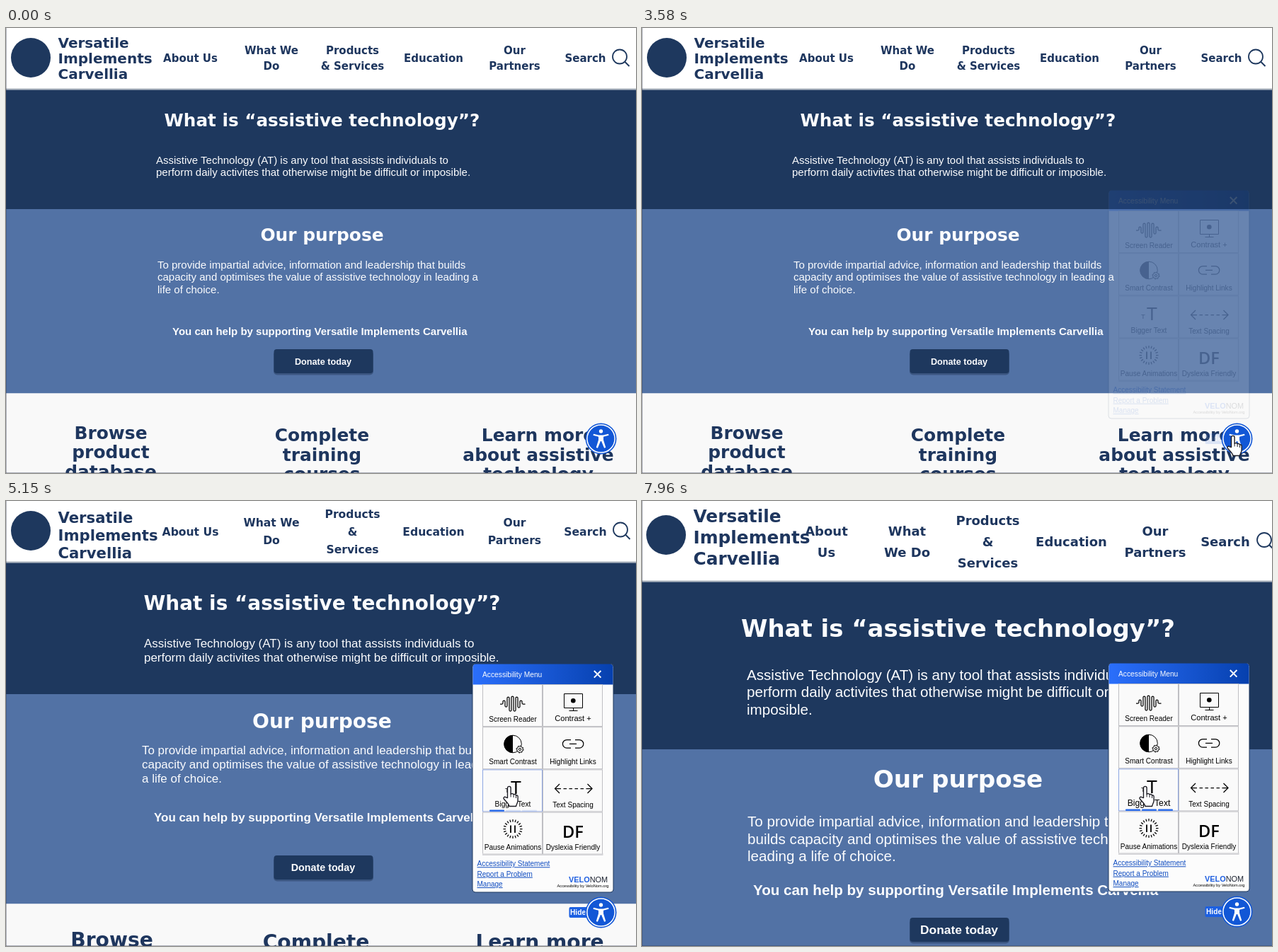
Recreate the animation shown at these times as an HTML page. Size 890 by 629 pixels, loop 8 s.

```html
<!DOCTYPE html>
<html lang="en">
<head>
<meta charset="utf-8">
<title>Bigger text demo</title>
<style>
  html, body { margin: 0; width: 100%; height: 100%; overflow: hidden; background: #fff; }
  svg { display: block; width: 100%; height: 100%; }
  text { font-family: "Liberation Sans", Arial, sans-serif; }
  .head { font-family: "DejaVu Sans", Verdana, sans-serif; font-weight: 700; }
  .bold { font-weight: 700; }
  .mid { text-anchor: middle; }
  .white { fill: #fbfcfe; }
  .navy { fill: #1e365e; }
  .link { fill: #0f4cc0; text-decoration: underline; }
  .line { fill: none; stroke: #000; stroke-width: 1.25; }
  .thin { fill: none; stroke: #000; stroke-width: 1; }
  .cell { fill: #fafafa; stroke: #bfbfc3; }
  .pointer { fill: #fff; stroke: #1c1c24; stroke-width: 1.4; stroke-linejoin: round; }
</style>
</head>
<body>
<svg id="stage" viewBox="0 0 890 629" preserveAspectRatio="none"></svg>
<script>
const LOOP = 8000;
const NAVY = '#1e385e', BLUE = '#5272a5';

const text = (x, y, s, size, cls = '') =>
  `<text x="${x}" y="${y}" font-size="${size}" class="${cls}">${s}</text>`;
const rect = (x, y, w, h, fill, more = '') =>
  `<rect x="${x}" y="${y}" width="${w}" height="${h}" fill="${fill}" ${more}/>`;
const circle = (x, y, r, more = '') => `<circle cx="${x}" cy="${y}" r="${r}" ${more}/>`;
const path = (d, cls = 'line', more = '') => `<path d="${d}" class="${cls}" ${more}/>`;
const lines = (x, y, s, gap, size, cls) =>
  s.split('/').map((row, i) => text(x, y + i * gap, row, size, cls)).join('');

// One page layout per text size
const about = 'Assistive Technology (AT) is any tool that assists individuals to/perform daily activites that otherwise might be difficult or';
const purpose = 'To provide impartial advice, information and leadership that';
const value = 'capacity and optimises the value of assistive technology in';
const wideNav = 'About Us|What We/Do|Products/&amp;/Services|Education|Our/Partners|Search';
const layouts = [
  { k: 1, brand: 20, brandX: 73.5, brandY: 28, brandGap: 22, mark: [35, 42],
    nav: 15, navY: 48, navGap: 22.7, navX: [260.5, 375, 489.5, 604, 718.5, 818.5], find: [867, 40.5],
    menu: 'About Us|What We/Do|Products/&amp; Services|Education|Our/Partners|Search',
    header: 87.5, mid: 256, end: 516.5, h1: 139, h2: 301, gap: 17.5,
    p1: [212, 191.5, about + ' imposible.'],
    p2: [214, 339.5, `${purpose} builds/${value} leading a/life of choice.`],
    help: [235, 433.5], button: 454, cards: 581, cardX: [148, 446.5, 752] },
  { k: 1.13, brand: 21.2, brandX: 73.5, brandY: 30.5, brandGap: 25, mark: [35, 42],
    nav: 15.6, navY: 48.5, navGap: 25, navX: [260.5, 375, 489.5, 604, 718.5, 818.5], find: [868, 40.5],
    menu: wideNav,
    header: 87.5, mid: 273, end: 569.5, h1: 154, h2: 321, gap: 20,
    p1: [195, 206.5, about + ' imposible.'],
    p2: [192, 358, `${purpose} builds/${value} leading/a life of choice.`],
    help: [209, 453], button: 501, cards: 630, cardX: [149.5, 438, 754] },
  { k: 1.25, brand: 23, brandX: 73, brandY: 29.5, brandGap: 27.5, mark: [34.5, 45],
    nav: 16.8, navY: 56, navGap: 27.5, navX: [260.5, 374.5, 489, 605, 722, 821], find: [873, 47],
    menu: wideNav,
    header: 101, mid: 299, end: 602, h1: 173, h2: 350, gap: 22.3,
    p1: [171, 230, about + ' imposible.'],
    p2: [170, 395, `${purpose} builds/${value} leading/a life of choice.`],
    help: [183, 492], button: 532, cards: 666, cardX: [150, 438, 754] },
  { k: 1.375, brand: 24.8, brandX: 72.5, brandY: 29.5, brandGap: 30, mark: [34, 48],
    nav: 18, navY: 63.5, navGap: 30, navX: [260.5, 374.5, 488.5, 606.5, 725, 824], find: [879, 55],
    menu: 'About/Us|What/We Do|Products/&amp;/Services|Education|Our/Partners|Search',
    header: 114.5, mid: 351, end: 660, h1: 192, h2: 405, gap: 24.5,
    p1: [148, 252.5, about + '/imposible.'],
    p2: [149, 460, `${purpose}/builds ${value}/leading a life of choice.`],
    help: [157, 556.5], button: 589, cards: 730, cardX: [150, 438, 754] }
];

function page(p) {
  const big = 24.9 * p.k, body = 15 * p.k;
  const [fx, fy] = p.find;
  const menu = p.menu.split('|').map((item, i) => {
    const top = p.navY - (item.split('/').length - 1) / 2 * p.navGap;
    return lines(p.navX[i], top, item, p.navGap, p.nav, 'head mid navy');
  }).join('');
  const cards = ['Browse/product/database', 'Complete/training/courses', 'Learn more/about assistive/technology']
    .map((s, i) => lines(p.cardX[i], p.cards + (i ? 3.2 : 0), s, 27.4 * p.k, big, 'head mid navy')).join('');
  return '<g>' +
    rect(0, 0, 890, p.header, '#fff') +
    rect(0, p.header - 2, 890, 2, '#a9b1bc') +
    rect(0, p.header, 890, p.mid - p.header, NAVY) +
    rect(0, p.mid, 890, p.end - p.mid, BLUE) +
    rect(0, p.end, 890, 200, '#f9f9f9') +
    circle(...p.mark, 28, `fill="${NAVY}"`) +
    lines(p.brandX, p.brandY, 'Versatile/Implements/Carvellia', p.brandGap, p.brand, 'head navy') +
    menu +
    circle(fx, fy, 10, `fill="none" stroke="${NAVY}" stroke-width="1.8"`) +
    path(`M${fx + 7} ${fy + 7}l6.5 6.5`, '', `stroke="${NAVY}" stroke-width="2"`) +
    text(446.5, p.h1, 'What is “assistive technology”?', 24.7 * p.k, 'head mid white') +
    lines(...p.p1, p.gap, body, 'white') +
    text(446.5, p.h2, 'Our purpose', big, 'head mid white') +
    lines(...p.p2, p.gap, body, 'white') +
    text(...p.help, 'You can help by supporting Versatile Implements Carvellia', body, 'bold white') +
    rect(378, p.button + 2.5, 141, 34, '#1a2c4c', 'rx="5" opacity=".4"') +
    rect(378.5, p.button, 140, 34, NAVY, 'rx="4"') +
    text(448, p.button + 17 + 4.5 * p.k, 'Donate today', 12.65 * p.k, 'bold mid white') +
    cards + '</g>';
}

function waveform() {
  let d = 'M698 286h2.5q1.5 0 1.5-1.5';
  [4, 5, 9, 11, 10, 11, 9, 6, 4].forEach((h, i) => {
    d += i % 2 ? `V${283.5 + h}a1.5 1.5 0 0 0 3 0` : `V${286.5 - h}a1.5 1.5 0 0 1 3 0`;
  });
  return path(d + 'V284.5q0 1.5 1.5 1.5h3');
}

function ticks() {
  let d = '';
  for (let i = 0; i < 20; i++) {
    const a = i * Math.PI / 10, c = Math.cos(a), s = Math.sin(a);
    d += `M${716 + c * 10} ${462.5 + s * 10}L${716 + c * 13.5} ${462.5 + s * 13.5}`;
  }
  return path(d);
}

function panel() {
  let cells = '';
  for (let i = 0; i < 8; i++) {
    const x = 673.5 + (i % 2) * 85, y = 258.5 + (i >> 1) * 60.2;
    cells += rect(x, y, 84, 59, '#fafafa', `class="cell" ${i === 4 ? 'id="active"' : ''}`);
  }
  const label = (x, y, s, size = 10.05) => text(x, y, s, size, 'mid');
  const bars = [683, 706, 729].map(x => rect(x, 435.5, 21, 2.5, '#2b6be8', 'class="bar" rx="1"')).join('');
  return '<g id="panel">' +
    rect(659, 229.5, 199, 322.5, '#fcfcfc', `rx="4" stroke="${NAVY}"`) +
    path('M659.5 258.5V234q0-4.5 4.5-4.5H853q4.500 0 4.500 4.500V258.5Z', '', 'fill="url(#bar)"') +
    text(673, 248, 'Accessibility Menu', 10.25, 'white') +
    path('M830.8 239l9.6 9.6m0-9.6l-9.6 9.6', '', 'stroke="#fff" stroke-width="2"') +
    cells + path('M673.5 500V497M843 500V497M673 499.5H843', '', 'stroke="#d4d4d8"') +
    waveform() + label(716, 311, 'Screen Reader') +
    path('M788.5 271.5h26v20h-26ZM801.5 292v3.5M795.5 295.5h12', 'thin') + circle(801.3, 281.3, 3.3) +
    label(801, 310.3, 'Contrast +', 11.1) +
    circle(716, 342.5, 12.3, 'class="thin"') + path('M716 330a12.5 12.5 0 0 0 0 25Z', '') +
    circle(726, 350, 5.6, 'fill="#fafafa"') +
    circle(726, 350, 4.2, 'class="thin"') +
    circle(726, 350, 5, 'class="thin" stroke-dasharray="1.9 2"') +
    circle(726, 350, 1.6, 'class="thin"') +
    label(716, 371, 'Smart Contrast') +
    path('M798 336.5h-5.8a5.8 5.8 0 0 0 0 11.6h5.8M804 336.5h6a5.8 5.8 0 0 1 0 11.6h-6M796 342.3h10') +
    label(801, 371, 'Highlight Links') +
    text(705, 411, 'T', 9.5) + text(712.7, 413, 'T', 25) +
    '<text id="bigger" x="716" y="431.3" class="mid">Bigger Text</text>' + bars +
    path('M782 399l-6.5 6.5 6.5 6.5M821.5 399l6.5 6.5-6.5 6.5') +
    path('M776 405.5H828', 'line', 'stroke-dasharray="8 3.5 4.5 3.5 4.5 3.5 4.5 3.5 4.5 3.5 9"') +
    label(801, 431.5, 'Text Spacing') +
    ticks() + path('M713 457.5v10.5M719 457.5v10.5', 'line', 'style="stroke-width:1.8"') +
    label(716, 491.5, 'Pause Animations') +
    '<text x="801" y="475" font-size="23.5" class="mid" style="font-family:\'Open Sans\',\'Noto Sans\',sans-serif;font-weight:600">DF</text>' +
    label(801, 491.5, 'Dyslexia Friendly') +
    lines(665.5, 515.3, 'Accessibility Statement/Report a Problem/Manage', 14.4, 10, 'link') +
    text(795, 538.3, '<tspan class="bold" fill="#1f5fe0">VELO</tspan><tspan fill="#1c2230">NOM</tspan>', 10.9) +
    text(778.5, 544.6, 'Accessibility by VeloNom.org', 5.7) +
    rect(795.5, 573, 32, 15, '#1c60e2', 'rx="2"') + text(797, 584.4, 'Hide', 10.2, 'bold white') +
    '</g>';
}

const badge =
  circle(840.5, 580.5, 22, 'fill="#1257d6"') +
  circle(840.5, 580.5, 19.6, 'fill="#1257d6" stroke="#fff" stroke-width="1.5"') +
  circle(840.5, 570, 2.7, 'fill="#fff"') +
  path('M830 573.8l7.5 1.6h6l7.5-1.6.5 2-7.5 2v4.5l3.3 10.7-2.2.8-4-9.8h-1.2l-4 9.8-2.200-.8 3.300-10.700v-4.500l-7.500-2Z', '', 'fill="#fff"');

const tooltip = '<g id="tip" style="filter:drop-shadow(0 2px 2px rgba(20,30,60,.3))">' +
  path('M799 481.5H881q5 0 5 5V538q0 5-5 5H851L840 552 829 543H799q-5 0-5-5V486.5q0-5 5-5Z', '',
    `fill="#fbfcfd" stroke="${NAVY}" stroke-width="1.8"`) +
  text(838.5, 501.5, 'Tap for help', 12.4, 'bold mid navy') +
  text(839.5, 516.5, 'viewing this', 12.4, 'bold mid navy') +
  text(840, 531.5, 'page', 12.4, 'bold mid navy') + '</g>';

const pointers =
  path('M0 0V21.5L5 17 8.6 25.3 12.6 23.6 9 15.6H16Z', 'pointer', 'id="arrow"') +
  '<g id="hand">' +
  path('M6 17V3.2a2.3 2.3 0 0 1 4.6 0V12c.6-1.3 3.6-1.2 4 .5 1.2-1 3.2-.3 3.4 1.2 1.3-.7 2.6.2 2.6 1.6V21c0 3-2 4.5-2.5 8H8.5C7.5 25 3 21.5.8 18.5c-1.2-1.8 1-3.6 2.8-2.2Z', 'pointer') +
  path('M10.6 12v4M14.6 13v3.5M18 14.5v3', 'pointer', 'style="stroke-width:1"') + '</g>';

const $ = id => document.getElementById(id);
$('stage').innerHTML =
  '<defs><linearGradient id="bar"><stop stop-color="#2b6ffb"/><stop offset="1" stop-color="#0640ae"/></linearGradient></defs>' +
  `<g id="pages">${layouts.map(page).join('')}</g>` +
  path('M.5 0V629M0 628.5H890', '', 'stroke="#28324a" stroke-opacity=".35"') +
  `<g id="widget">${panel()}${badge}</g>` + tooltip + pointers;

const pages = [...$('pages').children];
const bars = [...document.querySelectorAll('.bar')];
const show = (el, on) => el.setAttribute('visibility', on ? 'visible' : 'hidden');
const move = (el, x, y) => el.setAttribute('transform', `translate(${x} ${y})`);
const ease = (t, a, b) => {
  const u = Math.min(1, Math.max(0, (t - a) / (b - a)));
  return u * u * (3 - 2 * u);
};

// Arrow tip: time, x, y
const route = [
  [1040, 773, 622], [1400, 806, 598], [1640, 836, 566], [1830, 841, 572],
  [1890, 841, 572], [2030, 842, 575], [2340, 842, 575], [2430, 832.5, 575]
];
function along(t) {
  if (t >= 5000) return [711.5, 402];
  const i = route.findIndex(k => k[0] > t);
  if (i < 1) return route[i ? route.length - 1 : 0].slice(1);
  const [t0, x0, y0] = route[i - 1], [t1, x1, y1] = route[i];
  const u = (t - t0) / (t1 - t0);
  return [x0 + (x1 - x0) * u, y0 + (y1 - y0) * u];
}

function draw(t) {
  const level = t < 5150 ? 0 : t < 6630 ? 1 : t < 7960 ? 2 : 3;
  pages.forEach((g, i) => show(g, i === level));
  show($('tip'), t >= 200 && t < 2830);

  const fade = ease(t, 3515, 3810);
  $('panel').setAttribute('opacity', fade);
  show($('panel'), fade > 0);
  move($('widget'), 0, level === 1 ? 1 : 0);
  $('active').style.stroke = level ? '#8ea6e2' : '';
  $('bigger').setAttribute('font-size', level === 3 ? 12.2 : 10.2);
  bars.forEach((b, i) => b.setAttribute('opacity', !level ? 0 : i < level ? 1 : 0.12));

  const hand = (t >= 2760 && t < 5080) || (t >= 5150 && t < 6550) || t >= 6690;
  const held = Math.floor((t - 20) / 70) * 70 + 20; // pointer moves in 70 ms steps
  const go = ease(held, 4130, 4680);
  show($('hand'), hand);
  show($('arrow'), !hand && t >= 1070);
  move($('hand'), 826.5 - 124 * go, 575.5 - 173 * go);
  move($('arrow'), ...along(held));
}

const start = performance.now();
function tick() {
  draw((performance.now() - start) % LOOP);
  requestAnimationFrame(tick);
}
tick();
</script>
</body>
</html>
```
